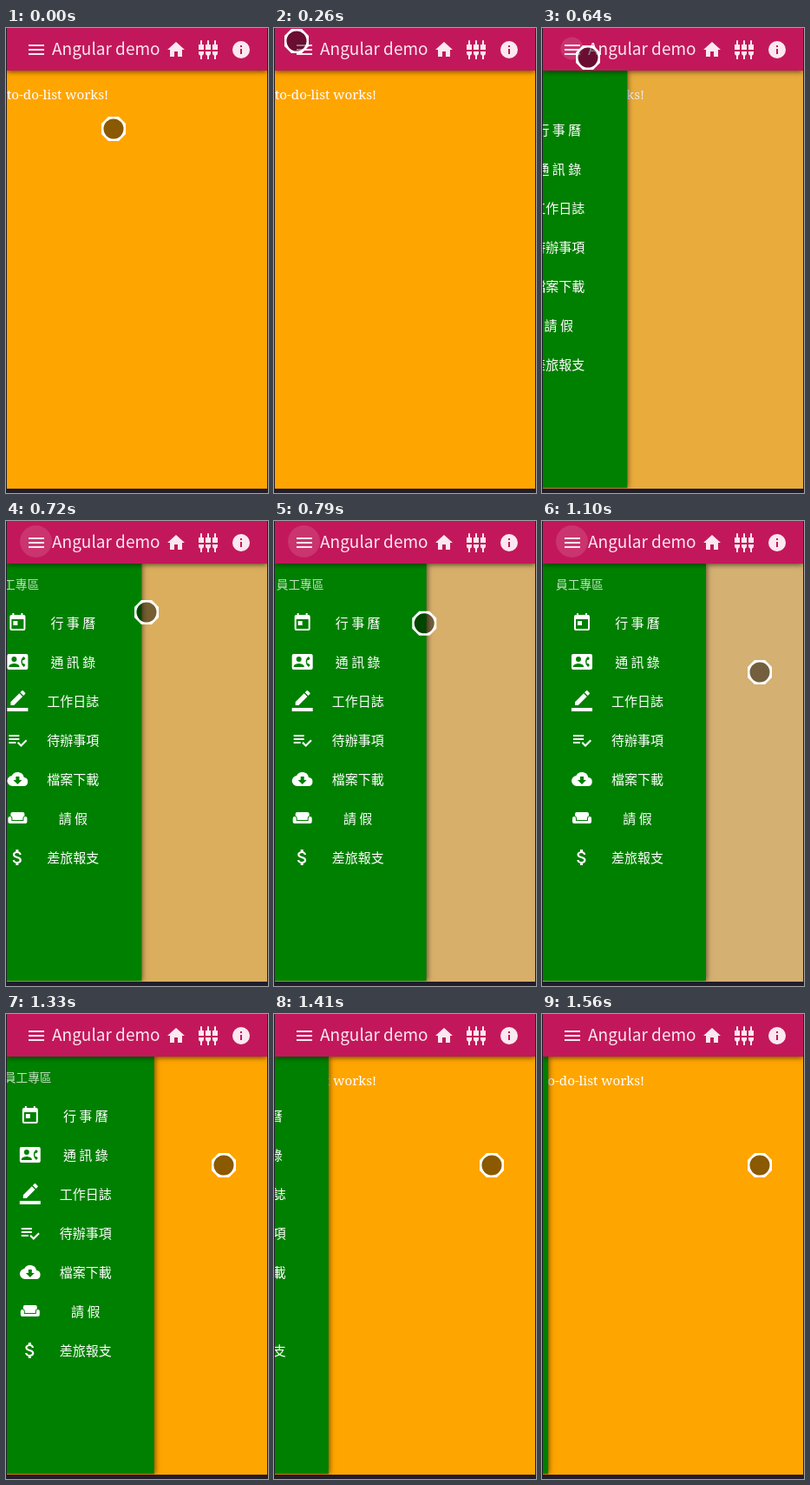
Animation of 302x535 px, one loop 1640 ms. Source, as an HTML page:

```html
<!DOCTYPE html>
<html lang="zh-Hant">
<head>
<meta charset="utf-8">
<title>Angular demo</title>
<style>
html, body { margin: 0; width: 100%; height: 100%; overflow: hidden; background: #211d2b; }
body { position: relative; font-family: "Noto Sans CJK TC", "Noto Sans CJK JP", "Noto Sans CJK", sans-serif; color: #fff; }
#app { position: absolute; left: 1px; top: 0; width: 300px; height: 530px; overflow: hidden; background: #ffa500; }
#app > *, .row > *, header > * { position: absolute; white-space: pre; }
svg { display: block; overflow: visible; fill: currentColor; }
header { left: 0; top: 0; width: 300px; height: 49px; background: #c2185b; color: #fce8f0; box-shadow: 0 1px 6px rgba(0,0,0,.65); }
header svg { top: 12.5px; }
header b { left: 52px; top: 9px; font-weight: 400; font-size: 19px; line-height: 28px; }
#focus { left: 15px; top: 5px; width: 37px; height: 37px; border-radius: 50%; background: rgba(255,255,255,.12); }
#page { left: 0; top: 66px; font: 300 15.2px/20px "Noto Serif", serif; }
#shade { inset: 0; background: rgba(183,183,190,.6); }
#drawer { left: 0; top: 49px; width: 188px; height: 480px; background: #008000; box-shadow: 1px 0 6px rgba(0,0,0,.55); }
#drawer h2 { position: absolute; left: 15px; top: 13px; margin: 0; font-weight: 400; font-size: 13.7px; line-height: 20px; color: rgba(255,255,255,.75); }
.row { position: absolute; left: 0; height: 24px; width: 188px; }
.row span { left: 69px; width: 80px; text-align: center; font-size: 15px; line-height: 24px; }
#cursor { position: absolute; left: -14px; top: -14px; }
</style>
</head>
<body>
<div id="app">
  <div id="page">to-do-list works!</div>
  <div id="shade"></div>
  <nav id="drawer"><h2>員工專區</h2></nav>
  <header><i id="focus"></i><b>Angular demo</b></header>
</div>
<svg id="cursor" width="28" height="28">
  <circle cx="14" cy="14" r="12" fill="rgba(0,0,0,.46)"/>
  <path fill="#fff" fill-rule="evenodd" d="M8 0H20L28 8V20L20 28H8L0 20V8ZM14 2.5A11.5 11.5 0 0 0 14 25.5A11.5 11.5 0 0 0 14 2.5Z"/>
</svg>
<script>
const $ = id => document.getElementById(id);
const icon = (path, x) =>
  `<svg width="24" height="24" viewBox="0 0 24 24" style="left:${x}px"><path d="${path}"/></svg>`;

const plug = x => `M${x} 6h2V2a1 1 0 0 1 2 0v4h2v6h-6zM${x} 14h6v2a3 3 0 0 1-2 2.82V23h-2v-4.18a3 3 0 0 1-2-2.82z`;

const toolbar = [
  [22, 'M3 18h18v-2H3zM3 13h18v-2H3zM3 6v2h18V6z'],
  [183, 'M10 20v-6h4v6h5v-8h3L12 3 2 12h3v8z'],
  [220, [1, 9, 17].map(plug).join('')],
  [257.5, 'M12 2a10 10 0 0 0 0 20a10 10 0 0 0 0-20zm1 15h-2v-6h2zm0-8h-2V7h2z']
];
toolbar.forEach(([x, path]) => document.querySelector('header').insertAdjacentHTML('beforeend', icon(path, x)));

const menu = [
  ['行 事 曆', 'M7 10h5v5H7zM16 1v2H8V1H6v2H5a2 2 0 0 0-2 2v14a2 2 0 0 0 2 2h14a2 2 0 0 0 2-2V5a2 2 0 0 0-2-2h-1V1zm3 18H5V8h14z'],
  ['通 訊 錄', 'M22 3H2a2 2 0 0 0-2 2v14a2 2 0 0 0 2 2h20a2 2 0 0 0 2-2V5a2 2 0 0 0-2-2zM8 6a3 3 0 0 1 0 6a3 3 0 0 1 0-6zm6 12H2v-1c0-2 4-3.1 6-3.1s6 1.1 6 3.1zm3.85-4h1.64L21 16l-1.99 1.99a7.5 7.5 0 0 1 0-11.98L21 8l-1.51 2h-1.64a6 6 0 0 0 0 4z'],
  ['工作日誌', 'M17.75 7L14 3.25l-10 10V17h3.75zM20.71 4.04a1 1 0 0 0 0-1.41L18.37.29a1 1 0 0 0-1.41 0L15 2.25 18.75 6zM0 20h24v4H0z'],
  ['待辦事項', 'M14 10H2v2h12zM14 6H2v2h12zM2 16h8v-2H2zM21.5 11.5L23 13l-6.99 7-4.51-4.5L13 14l3.01 3z'],
  ['檔案下載', 'M19.35 10.04A7.5 7.5 0 0 0 5.35 8.04A6 6 0 0 0 6 20h13a5 5 0 0 0 .35-9.96zM17 13l-5 5-5-5h3V9h4v4z'],
  ['請 假', 'M21 10a2 2 0 0 0-2 2v3H5v-3a2 2 0 0 0-4 0v4a2 2 0 0 0 2 2h18a2 2 0 0 0 2-2v-4a2 2 0 0 0-2-2zM18 5H6a2 2 0 0 0-2 2v2.15a3 3 0 0 1 2 2.82V14h12v-2.03a3 3 0 0 1 2-2.82V7a2 2 0 0 0-2-2z'],
  ['差旅報支', 'M11.8 10.9c-2.27-.59-3-1.2-3-2.15 0-1.09 1.01-1.85 2.7-1.85 1.78 0 2.44.85 2.5 2.1h2.21c-.07-1.72-1.12-3.3-3.21-3.81V3h-3v2.16c-1.94.42-3.5 1.68-3.5 3.61 0 2.31 1.91 3.46 4.7 4.13 2.5.6 3 1.48 3 2.41 0 .69-.49 1.79-2.7 1.79-2.06 0-2.87-.92-2.98-2.1h-2.2c.12 2.19 1.76 3.42 3.68 3.83V21h3v-2.15c1.95-.37 3.5-1.5 3.5-3.55 0-2.84-2.43-3.81-4.7-4.4z']
];
$('drawer').insertAdjacentHTML('beforeend', menu.map(([label, path], i) =>
  `<div class="row" style="top:${56 + 45 * i}px">${icon(path, 33)}<span>${label}</span></div>`).join(''));

const LOOP = 1640, OPEN = 563, CLOSE = 1318;
// The screen refreshes only at these moments.
const ticks = [0, 70, 130, 200, 260, 640, 720, 790, 870, 950, 1020, 1100, 1330, 1410, 1480, 1560];
// Pointer path: time, x, y.
const track = [[0, 124, 116], [260, 26, 15], [640, 53, 34], [720, 162, 105], [950, 199, 147], [1100, 251, 174], [LOOP, 251, 174]];

// cubic-bezier(.25, .8, .25, 1)
function ease(x) {
  if (x <= 0) return 0;
  if (x >= 1) return 1;
  let lo = 0, hi = 1;
  for (let i = 0; i < 24; i++) {
    const m = (lo + hi) / 2;
    if (.75 * m * (1 - m) + m ** 3 < x) lo = m; else hi = m;
  }
  const u = 1 - lo;
  return 2.4 * lo * u * u + 3 * lo * lo * u + lo ** 3;
}

function pointer(t) {
  const i = track.findIndex(p => p[0] > t);
  const [t0, x0, y0] = track[i - 1], [t1, x1, y1] = track[i];
  const k = (t - t0) / (t1 - t0);
  return [x0 + (x1 - x0) * k, y0 + (y1 - y0) * k];
}

function draw() {
  const now = performance.now() % LOOP;
  const t = ticks.filter(v => v <= now).pop();
  const closing = t >= CLOSE;
  const open = closing ? 1 - ease((t - CLOSE) / 400) : ease((t - OPEN) / 467);
  const [x, y] = pointer(t);
  $('drawer').style.transform = `translateX(${(open - 1) * 188}px)`;
  $('drawer').style.visibility = open ? 'visible' : 'hidden';
  $('shade').style.opacity = closing ? 0 : open;
  $('focus').style.opacity = closing || t < OPEN ? 0 : 1;
  $('focus').style.transform = `scale(${t < 720 ? .7 : 1})`;
  $('cursor').style.transform = `translate(${x}px, ${y}px)`;
  requestAnimationFrame(draw);
}
draw();
</script>
</body>
</html>
```
